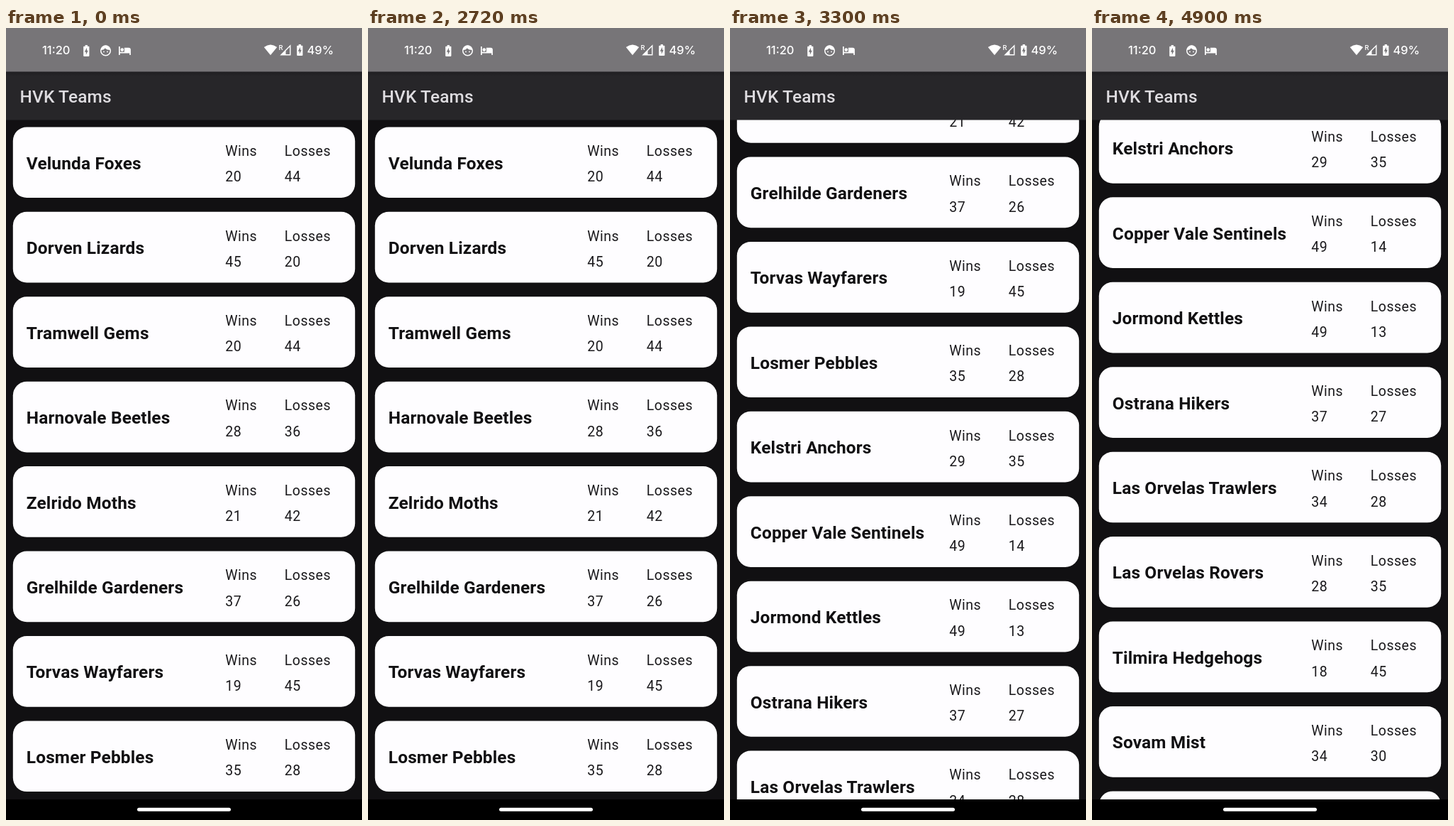
An HTML page for the animation above (5300 ms loop, 502 px wide and 1115 px high).

```html
<!DOCTYPE html>
<html lang="en">
<head>
<meta charset="utf-8">
<title>Team list</title>
<style>
  html, body { margin: 0; width: 100%; height: 100%; overflow: hidden; background: #111012; }
  svg { display: block; width: 502px; height: 1115px; }
  text { font-family: Roboto, sans-serif; }
  .name { font-size: 24.43px; font-weight: 700; letter-spacing: .15px; fill: #111012; }
  .stat { font-size: 19.54px; letter-spacing: .5px; fill: #1b1a1d; }
  .title { font-size: 24.43px; font-weight: 500; letter-spacing: .15px; fill: #dedce0; }
  .status { font-family: Inter, sans-serif; font-size: 16.5px; font-weight: 500; fill: #fff; }
</style>
</head>
<body>
<svg viewBox="0 0 502 1115">
  <defs>
    <linearGradient id="shade" x1="0" y1="0" x2="0" y2="1">
      <stop offset="0" stop-color="#1f1e21"/>
      <stop offset="1" stop-color="#272629"/>
    </linearGradient>
    <g id="battery">
      <path d="M-1.6 -8h3.2v1.7h1.6a.9 .9 0 0 1 .9 .9V7a1 1 0 0 1-1 1h-6.2a1 1 0 0 1-1-1V-5.4a.9 .9 0 0 1 .9-.9h1.6z" fill="#fff"/>
      <path d="M.7 -4.2L-2.5 1.8H-.5V5.8L2.5 -.3H.7z" fill="#777578"/>
    </g>
  </defs>
  <rect width="502" height="1115" fill="#111012"/>
  <g id="list"></g>

  <rect y="61" width="502" height="68.5" fill="#272629"/>
  <rect y="61" width="502" height="7" fill="url(#shade)"/>
  <text class="title" x="19.5" y="105">HVK Teams</text>

  <rect width="502" height="61.5" fill="#777578"/>
  <text class="status" x="51" y="37.3">11:20</text>
  <use href="#battery" x="113.3" y="32"/>
  <g transform="translate(140.5 32)">
    <circle r="6.8" fill="none" stroke="#fff" stroke-width="1.5"/>
    <path d="M-6.8 -1A6.8 6.8 0 0 1 6.8 -1Q2 -.8 -.8 -3.6Q-3 -.6 -6.8 -1z" fill="#fff"/>
    <circle cx="-2.5" cy="1.4" r=".9" fill="#fff"/>
    <circle cx="2.5" cy="1.4" r=".9" fill="#fff"/>
  </g>
  <g fill="#fff">
    <path d="M159 26h1.7v7.7h6.2v-6h6a3 3 0 0 1 3 3V38h-1.7v-2.6h-13.5V38H159z"/>
    <circle cx="163.8" cy="30.6" r="2.3"/>
    <path d="M363.8 27Q373 20 382.2 27L373 38.3z"/>
  </g>
  <path d="M400.8 25V37.8H388z" fill="none" stroke="#fff" stroke-width="1.4"/>
  <path d="M394.5 31.5V38H388z" fill="#fff"/>
  <text x="384.5" y="30.6" font-size="9.5" font-weight="500" fill="#fff">R</text>
  <use href="#battery" x="414.3" y="31"/>
  <text class="status" x="424.5" y="37.3">49%</text>

  <rect y="1086" width="502" height="29" fill="#000"/>
  <rect x="185" y="1097.7" width="132" height="5" rx="2.5" fill="#fff"/>
</svg>
<script>
  const teams = [
    ["Velunda Foxes", 20, 44],
    ["Dorven Lizards", 45, 20],
    ["Tramwell Gems", 20, 44],
    ["Harnovale Beetles", 28, 36],
    ["Zelrido Moths", 21, 42],
    ["Grelhilde Gardeners", 37, 26],
    ["Torvas Wayfarers", 19, 45],
    ["Losmer Pebbles", 35, 28],
    ["Kelstri Anchors", 29, 35],
    ["Copper Vale Sentinels", 49, 14],
    ["Jormond Kettles", 49, 13],
    ["Ostrana Hikers", 37, 27],
    ["Las Orvelas Trawlers", 34, 28],
    ["Las Orvelas Rovers", 28, 35],
    ["Tilmira Hedgehogs", 18, 45],
    ["Sovam Mist", 34, 30],
    ["", "", ""]
  ];
  const LOOP = 5300, TOP = 139.4, PITCH = 119.43;
  // [start time, scroll offset]: the list jumps between positions
  const stops = [[0, 0], [3200, 555], [4200, 949.8], [4300, 975.9]];

  const list = document.getElementById("list");
  const label = (cls, x, y, s) => `<text class="${cls}" x="${x}" y="${y}">${s}</text>`;

  list.innerHTML = teams.map(([name, wins, losses], i) =>
    `<g transform="translate(0 ${TOP + i * PITCH})">
      <rect x="9.8" width="482.4" height="99.7" rx="19.5" fill="#fefdff"/>
      ${label("name", 28.8, 59.4, name)}
      ${label("stat", 309.2, 40.8, "Wins")}${label("stat", 309.2, 77, wins)}
      ${label("stat", 392.8, 40.8, "Losses")}${label("stat", 392.8, 77, losses)}
    </g>`).join("");

  function draw(t) {
    const [, offset] = stops.filter(([start]) => start <= t).pop();
    list.setAttribute("transform", `translate(0 ${-offset})`);
  }

  const begin = performance.now();
  function tick() {
    draw((performance.now() - begin) % LOOP);
    requestAnimationFrame(tick);
  }
  tick();
</script>
</body>
</html>
```
